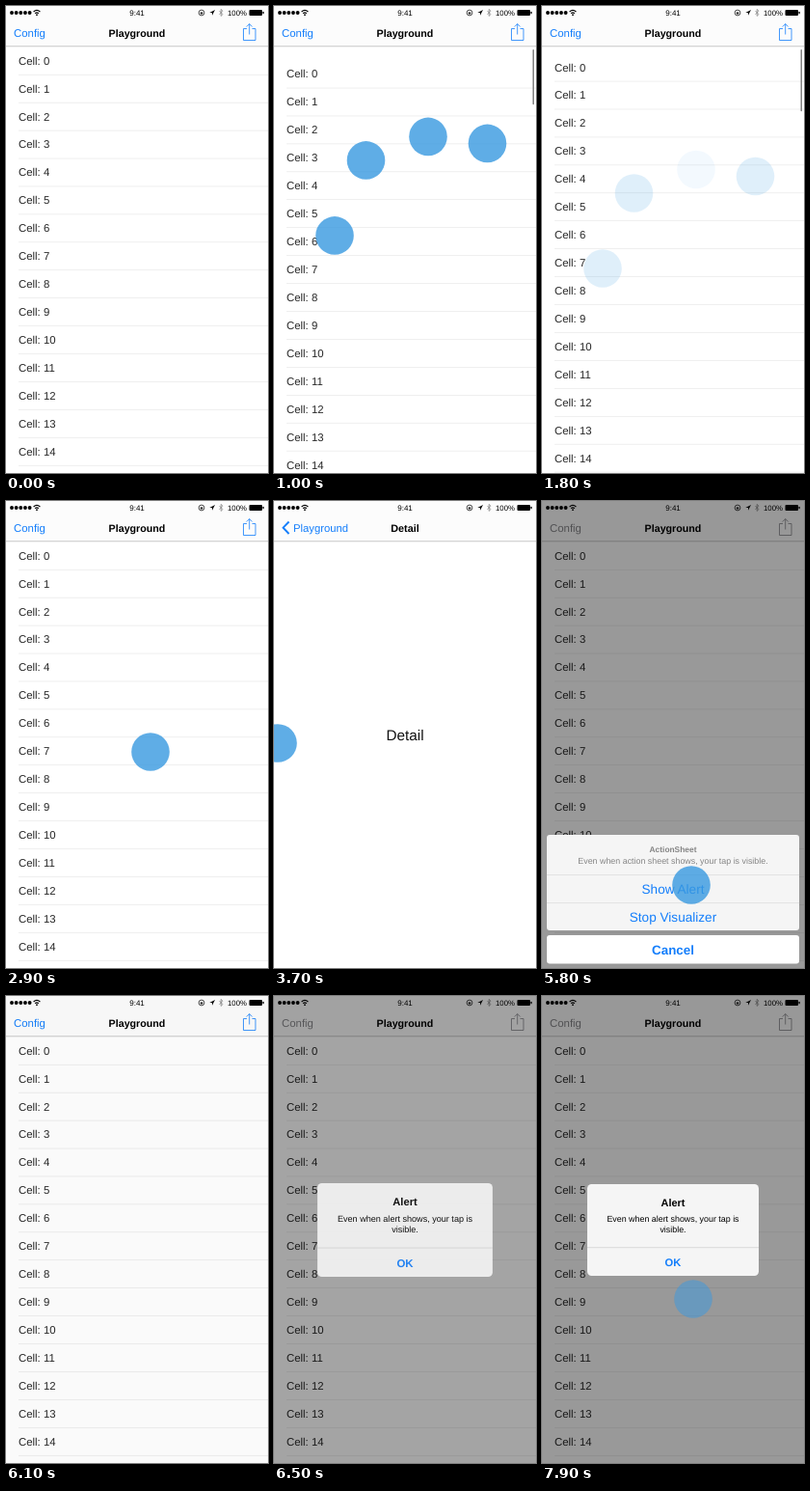
These frames come from a looping animation (272x484 px, 8000 ms). An HTML page:

```html
<!DOCTYPE html>
<html lang="en">
<head>
<meta charset="utf-8">
<title>Touch playground</title>
<style>
  html, body { margin: 0; width: 100%; height: 100%; overflow: hidden; background: #fff; }
  svg { display: block; width: 272px; height: 484px; font-family: "Liberation Sans", Arial, sans-serif; text-rendering: geometricPrecision; }
  .mid { text-anchor: middle; }
  .bold { font-weight: bold; }
  .blue { fill: #147efb; }
  .tint { fill: var(--tint); }
  .line { fill: none; stroke: var(--tint); }
</style>
</head>
<body>
<svg id="stage" viewBox="0 0 272 484">
  <rect width="272" height="484" fill="#fff"/>
  <g id="list">
    <rect id="highlight" y="244.5" width="272" height="29" fill="#d9d9d9"/>
    <g id="rows" font-size="11.4" fill="#262626"></g>
    <rect id="shade" y="42" width="272" height="442"/>
  </g>
  <rect id="scrollbar" x="268.5" y="45" width="1.5" rx="0.7" fill="#808080"/>
  <g id="detail">
    <rect y="42" width="272" height="442" fill="#fff"/>
    <text class="mid" x="136" y="248" font-size="15.3" fill="#111">Detail</text>
  </g>

  <rect width="272" height="42" fill="#fcfcfc"/>
  <rect y="41.5" width="272" height="0.7" fill="#b2b2b2"/>
  <g id="status">
    <g id="dots"></g>
    <g fill="none" stroke="#000" stroke-width="1.1">
      <path d="M28.6 6Q32 2.8 35.4 6M30.1 7.7Q32 5.9 33.9 7.7"/>
      <circle cx="203" cy="7" r="2.9" stroke-width="0.7"/>
      <path d="M221.5 5L225 8.6L223.2 10.4V3.4L225 5.2L221.5 8.8" stroke="#777" stroke-width="0.7"/>
    </g>
    <circle cx="32" cy="9.2" r="0.9"/>
    <rect x="201.8" y="6.5" width="2.4" height="1.9"/>
    <path d="M217 4L211.3 6.9H214V9.8Z"/>
    <text class="mid" x="136" y="9.8" font-size="8">9:41</text>
    <text x="230" y="9.8" font-size="7.8">100%</text>
    <rect x="252.5" y="4" width="13.5" height="6" rx="1"/>
    <rect x="266.5" y="5.8" width="1.2" height="2.4" rx="0.5"/>
  </g>
  <g id="barItems">
    <text class="tint" x="8" y="31.5" font-size="11.4">Config</text>
    <path id="share" class="line" d="M250 23.5H246.5V35.5H259V23.5H255.5M252.7 29.5V18.5M249.7 21.5L252.7 18.5L255.7 21.5" stroke-width="0.8"/>
  </g>
  <text id="listTitle" class="mid bold" x="136" y="31.5" font-size="10.7">Playground</text>
  <g id="backItem">
    <path class="line" d="M15.5 21.5L9.5 27.7L15.5 34" stroke-width="1.9"/>
    <text id="backLabel" class="tint" x="20" y="31.5" font-size="11.3">Playground</text>
  </g>
  <text id="detailTitle" class="mid bold" x="136" y="31.5" font-size="10.8">Detail</text>

  <rect id="dim" width="272" height="484"/>
  <g id="sheet" class="mid">
    <rect x="5" y="346" width="262" height="99" rx="3" fill="#f5f5f5"/>
    <path d="M5 387.5H267M5 416.5H267" stroke="#dcdcdc" stroke-width="0.7"/>
    <rect x="5" y="450" width="262" height="29.5" rx="3" fill="#fff"/>
    <g fill="#858585">
      <text class="bold" x="136" y="364" font-size="8.4">ActionSheet</text>
      <text x="136" y="375.5" font-size="8.9">Even when action sheet shows, your tap is visible.</text>
    </g>
    <g class="blue" font-size="13.6">
      <text x="136" y="406.5">Show Alert</text>
      <text x="136" y="435.5">Stop Visualizer</text>
      <text class="bold" x="136" y="469.5" font-size="13.4">Cancel</text>
    </g>
  </g>
  <g id="alert" class="mid">
    <rect x="47" y="195" width="178" height="95" rx="4.5" fill="#f5f5f5"/>
    <path d="M47 260.7H225" stroke="#cfcfcf" stroke-width="0.7"/>
    <text class="bold" x="136" y="218" font-size="10.9">Alert</text>
    <g font-size="8.9">
      <text x="136" y="234">Even when alert shows, your tap is</text>
      <text x="136" y="244.5">visible.</text>
    </g>
    <text class="bold blue" x="136" y="280" font-size="11.2">OK</text>
  </g>
  <g id="touches" fill="#3899e0"></g>
</svg>
<script>
const LOOP = 8000, STEP = 100, ROW = 28.93;
const el = id => document.getElementById(id);
const set = (id, attrs) => {
  for (const name in attrs) el(id).setAttribute(name, attrs[name]);
};
const clamp = v => Math.min(1, Math.max(0, v));
const span = (t, a, b) => clamp((t - a) / (b - a));
const smooth = v => v * v * (3 - 2 * v);
const easeOut = v => 1 - (1 - v) ** 3;
const mix = (a, b, v) => a + (b - a) * v;
const settle = (t, start, tau) => t < start ? 0 : 1 - Math.exp((start - t) / tau);
const shift = x => `translate(${x} 0)`;

el('dots').innerHTML = [0, 1, 2, 3, 4]
  .map(i => `<circle cx="${6 + 4.65 * i}" cy="7" r="1.95"/>`).join('');
el('rows').innerHTML = Array.from({ length: 16 }, (_, i) => {
  const y = 42 + ROW * i;
  return `<text x="13" y="${y + 18.7}">Cell: ${i}</text>
    <rect x="13" y="${y + ROW}" width="259" height="0.6" fill="#e4e4e4"/>`;
}).join('');

// Finger travel while the list is pulled past its top.
const pull = t => 60 * smooth(span(t, 500, 1600));
const rubberBand = d => 442 * (1 - 1 / (d * 0.55 / 442 + 1));
const swipeX = t => mix(4, 214, smooth(span(t, 3700, 4300)));
const finger = (start, end, x, y) => ({ start, end, at: t => [x, y + pull(t) - 60] });
const tap = (start, end, x, y) => ({ start, end, at: () => [x, y] });
const curve = (points, v) => points.length < 2 ? points[0] :
  curve(points.slice(1).map((p, i) => p.map((c, k) => mix(points[i][k], c, v))), v);

const touches = [
  finger(500, 1700, 95.5, 194),
  finger(500, 1640, 160, 169.5),
  finger(500, 1700, 221.5, 176.5),
  finger(600, 1700, 63, 272),
  tap(2900, 3000, 150, 260),
  { start: 3600, end: 4300, at: t => [swipeX(t), 251] },
  tap(4900, 4995, 257.7, 33),
  tap(5700, 5800, 155, 398),
  { start: 7500, end: 7870,
    at: t => curve([[45, 192], [135, 205], [245, 300], [157, 314]], span(t, 7500, 7900)) }
];
el('touches').innerHTML = '<circle r="19.8"/>'.repeat(touches.length);
const discs = [...el('touches').children];

function pushProgress(t) {
  if (t < 3700) return easeOut(span(t, 3050, 3600));
  const dragged = 1 - (swipeX(t) - 4) / 272;
  return dragged * (1 - easeOut(span(t, 4300, 4650)));
}

function sheetProgress(t) {
  if (t < 5860) return settle(t, 5050, 90);
  return t < 6200 ? Math.exp((5860 - t) / 80) : 0;
}

function render(t) {
  const push = pushProgress(t);
  const pulled = t < 1650 ? rubberBand(pull(t)) : rubberBand(60) * Math.exp((1650 - t) / 100);
  const offset = t < 2300 ? pulled : 0;
  set('list', { transform: shift(-82 * push) });
  set('rows', { transform: `translate(0 ${offset})` });
  set('highlight', { opacity: t >= 3000 && t < 4700 ? (t < 3700 ? 1 : push) : 0 });
  set('shade', { opacity: 0.1 * push });
  set('detail', { transform: shift(272 * (1 - push)) });
  set('scrollbar', {
    height: 71 - offset,
    opacity: (t >= 600 && t < 2300) || (t >= 4700 && t < 5300) ? 1 : 0
  });

  set('barItems', { opacity: 1 - push });
  set('share', { opacity: t >= 4900 && t <= 5000 ? 0.2 : 1 });
  set('listTitle', { transform: shift(-87 * push), opacity: 1 - push });
  set('backItem', { opacity: push });
  set('backLabel', { transform: shift(87 * (1 - push)) });
  set('detailTitle', { transform: shift(120 * (1 - push)), opacity: push });

  const sheet = sheetProgress(t);
  const alert = settle(t, 6310, 85);
  const cover = Math.max(sheet, alert);
  el('stage').style.setProperty('--tint', cover > 0.3 ? '#858589' : '#147efb');
  set('dim', { opacity: 0.4 * cover });
  set('sheet', { transform: `translate(0 ${145 * (1 - sheet)})`, opacity: sheet ? 1 : 0 });
  set('alert', {
    transform: `translate(136 242.5) scale(${1.2 - 0.2 * alert}) translate(-136 -242.5)`,
    opacity: alert
  });

  touches.forEach(({ start, end, at }, i) => {
    const [x, y] = at(t);
    const alpha = t < start ? 0 : 0.8 * Math.exp(-Math.max(0, t - end) / 62);
    discs[i].setAttribute('cx', x);
    discs[i].setAttribute('cy', y);
    discs[i].setAttribute('opacity', alpha < 0.01 ? 0 : alpha);
  });
}

const began = performance.now();
function tick() {
  const t = (performance.now() - began) % LOOP;
  render(Math.floor(t / STEP) * STEP);
  requestAnimationFrame(tick);
}
tick();
</script>
</body>
</html>
```
